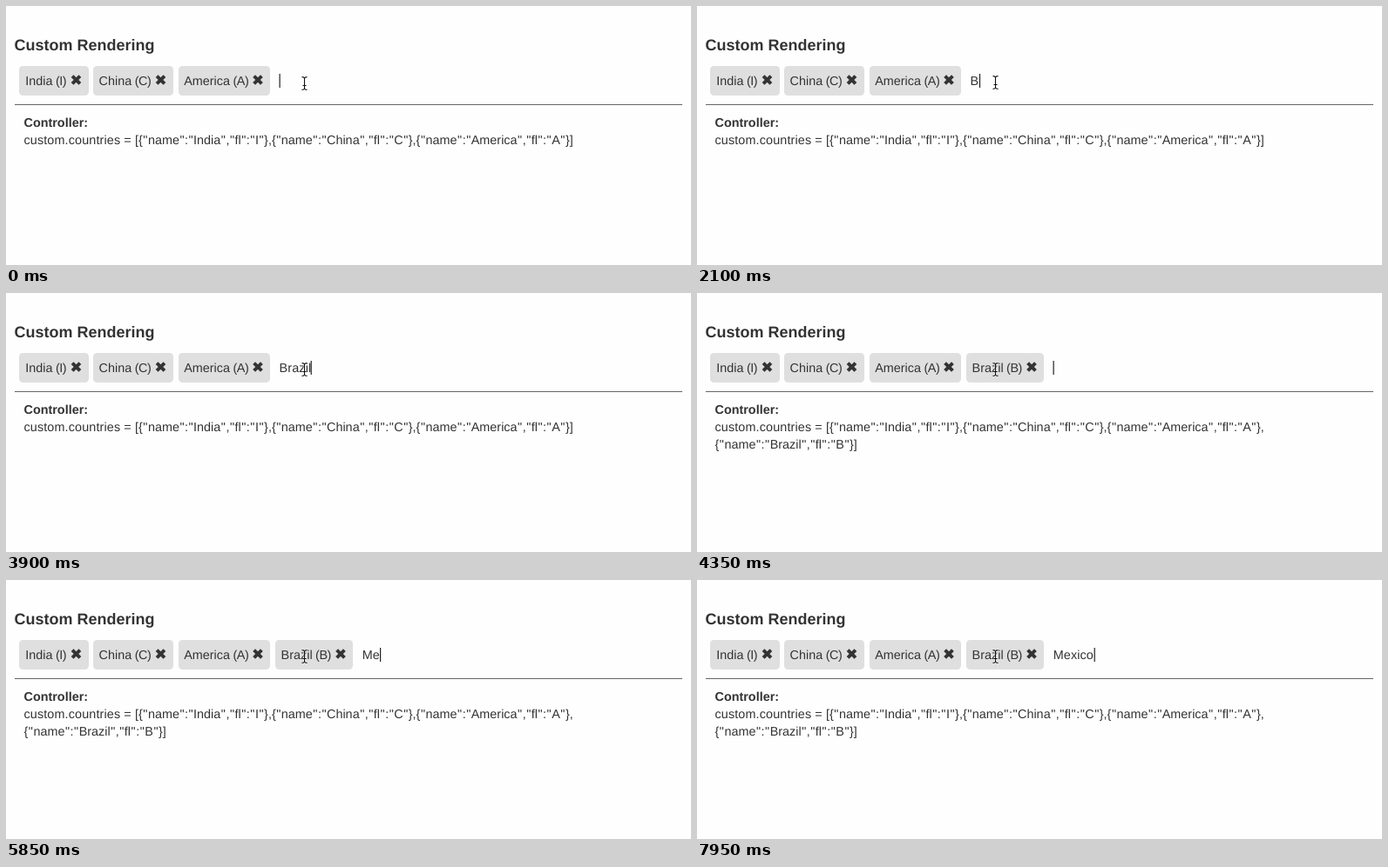
An HTML page for the animation above (8 s loop, 786 px wide and 298 px high).

```html
<!DOCTYPE html>
<html lang="en">
<head>
<meta charset="utf-8">
<title>Custom Rendering</title>
<style>
  html, body { margin: 0; width: 100%; height: 100%; overflow: hidden; background: #fefefe; }
  svg { display: block; }
  text {
    font: 14.4px "Liberation Sans", Arial, sans-serif;
    fill: #333;
    text-rendering: geometricPrecision;
    white-space: pre;
  }
  .title { font-size: 18px; font-weight: bold; }
  .label { font-weight: bold; }
  .wide { letter-spacing: .12px; }
  .quote { letter-spacing: .5px; }
  .paren { letter-spacing: -.5px; }
  .tag rect { fill: #dfdfdf; }
  .tag path { stroke: #333; stroke-width: 4; }
  #caret { fill: #222; }
  #pointer path { fill: none; stroke: #111; stroke-width: 1.1; }
  #pointer .halo { stroke: #fff; stroke-width: 2.4; opacity: .6; }
</style>
</head>
<body>
<svg width="786" height="298" viewBox="0 0 786 298">
  <text class="title" x="9.6" y="51">Custom Rendering</text>
  <g id="tags"></g>
  <rect x="10" y="113" width="766" height="1" fill="#666"/>
  <text class="label" x="20.5" y="139">Controller:</text>
  <text id="line1" x="20.5" y="159"></text>
  <text id="line2" x="20.5" y="179"></text>
  <text id="typed" class="wide" y="91"></text>
  <rect id="caret" y="78" width="1.2" height="16"/>
  <g id="pointer">
    <path class="halo" d="M-3-7.4Q-.4-7.4 0-5.8Q.4-7.4 3-7.4M0-6V6M-2 2.5H2M-3 7.4Q-.4 7.4 0 5.8Q.4 7.4 3 7.4"/>
    <path d="M-3-7.4Q-.4-7.4 0-5.8Q.4-7.4 3-7.4M0-6V6M-2 2.5H2M-3 7.4Q-.4 7.4 0 5.8Q.4 7.4 3 7.4"/>
  </g>
</svg>
<script>
const LOOP = 8000, COMMIT = 4350;
const $ = id => document.getElementById(id);

// name, box left, box width, text x, icon x
const countries = [
  ["India", 15, 80, 22.3, 80.5],
  ["China", 100, 92, 106.6, 177.5],
  ["America", 198, 105, 204.2, 289],
  ["Brazil", 309, 89, 315.6, 384]
];

// start time, input text, caret x (0 = hidden)
const steps = [
  [0, "", 313.5], [150, "", 0], [750, "", 313.5], [1200, "", 0], [1650, "", 313.5],
  [2100, "B", 323.9], [2400, "Br", 328.6], [2700, "Bra", 336.5], [3150, "Bra", 0],
  [3450, "Braz", 342.6], [3750, "Brazi", 346.5], [3900, "Brazil", 349.6],
  [COMMIT, "", 408.5], [4950, "", 0], [5400, "", 408.5],
  [5550, "M", 420.6], [5850, "Me", 429], [6450, "Me", 0], [6750, "Mex", 436.6],
  [6900, "Mexi", 439.6], [7350, "Mexi", 0], [7650, "Mexic", 447.5], [7950, "Mexico", 455.6]
];

const space = s => s
  .replace(/"/g, "<tspan class='quote' dx='.5'>&quot;</tspan>")
  .replace(/[()]/g, "<tspan class='paren' dx='-.5'>$&</tspan>");

const json = list => list.map(([name]) => JSON.stringify({ name, fl: name[0] })).join(",");

$("tags").innerHTML = countries.map(([name, x, w, tx, ix]) => `
  <g class="tag">
    <rect x="${x}" y="69" width="${w}" height="34" rx="4.5"/>
    <text x="${tx}" y="91">${space(`${name} (${name[0]})`)}</text>
    <path d="M${ix - 4.4} 80.6l8.8 8.8m0-8.8l-8.8 8.8"/>
  </g>`).join("");

const lastTag = $("tags").lastElementChild;
const head = "<tspan class='wide'>custom.countries = </tspan>" +
  space("[" + json(countries.slice(0, 3)));
const tail = space(json(countries.slice(3)) + "]");
let shown = null;

function render(t) {
  const step = steps.findLast(s => s[0] <= t);
  const added = t >= COMMIT;
  $("pointer").setAttribute("transform", `translate(342.5 ${t < 450 ? 89 : 88})`);
  if (step === shown) return;
  shown = step;
  const [, text, caret] = step;
  lastTag.style.display = added ? "" : "none";
  $("line1").innerHTML = head + (added ? "," : "]");
  $("line2").innerHTML = added ? tail : "";
  $("typed").setAttribute("x", added ? 408.7 : 313.6);
  $("typed").textContent = text;
  $("caret").style.display = caret ? "" : "none";
  $("caret").setAttribute("x", caret);
}

function tick() {
  render(performance.now() % LOOP);
  requestAnimationFrame(tick);
}
tick();
</script>
</body>
</html>
```
